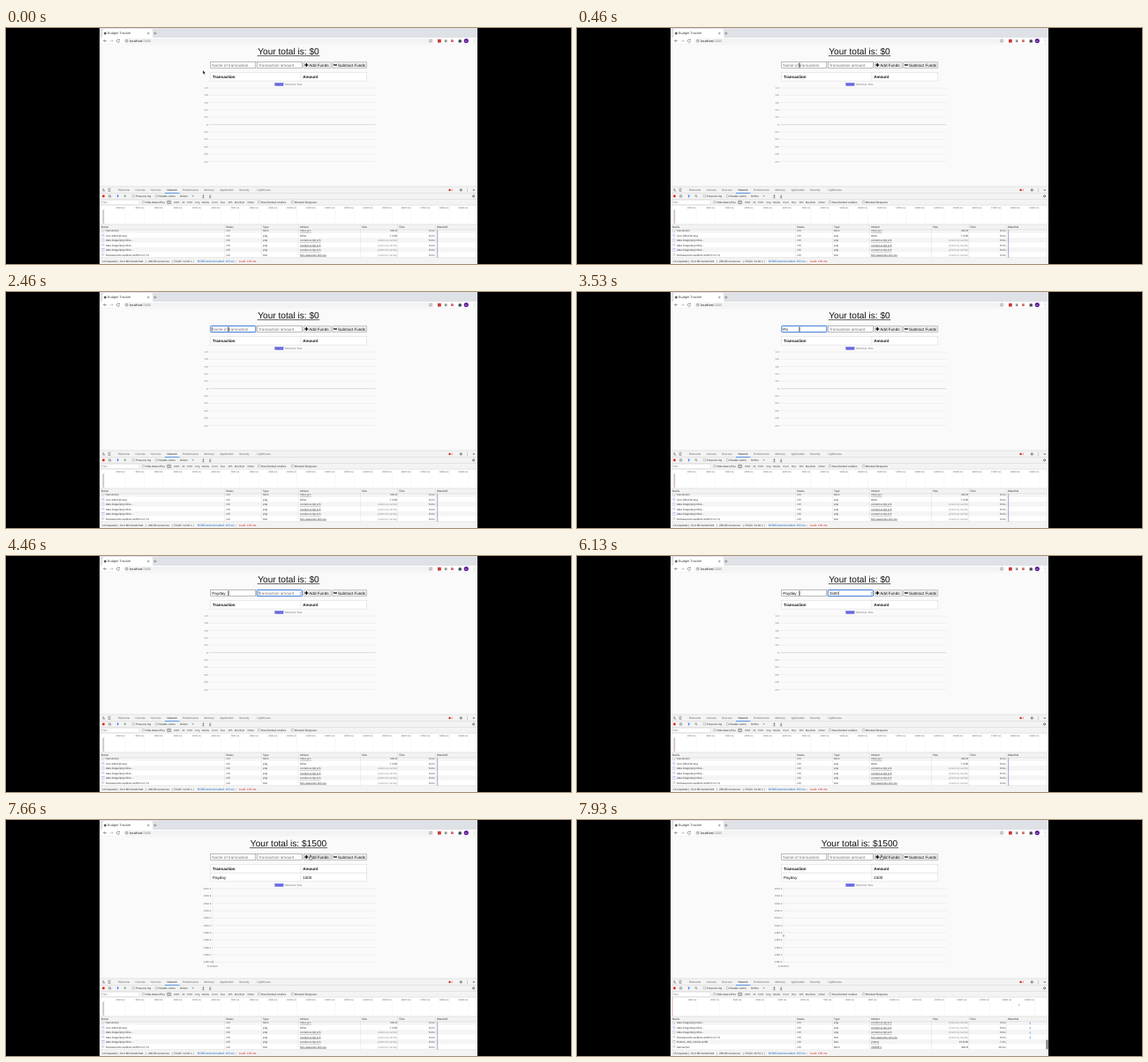
Write an HTML page that moves like this. It is 640 px wide and 268 px high and loops after 8 s.

```html
<!DOCTYPE html>
<html lang="en">
<head>
<meta charset="utf-8">
<title>Budget Tracker</title>
<style>
  html, body { margin: 0; width: 100%; height: 100%; overflow: hidden; background: #000; }
  svg { display: block; overflow: hidden; }
  #stage { width: 640px; height: 268px; }
  text { font-family: "Liberation Sans", Arial, sans-serif; text-rendering: geometricPrecision; white-space: pre; }
</style>
</head>
<body>
<svg id="stage" viewBox="0 0 640 268"></svg>
<script>
const LOOP = 8000, FRAME = 1000 / 15;
const stage = document.getElementById("stage");

function add(parent, tag, attrs = {}) {
  const node = document.createElementNS("http://www.w3.org/2000/svg", tag);
  for (const key in attrs) node.setAttribute(key, attrs[key]);
  return parent.appendChild(node);
}
const group = (parent, attrs) => add(parent, "g", attrs);
const rect = (p, x, y, width, height, fill, more) => add(p, "rect", { x, y, width, height, fill, ...more });
const line = (p, x1, y1, x2, y2, stroke, w = 0.5) => add(p, "line", { x1, y1, x2, y2, stroke, "stroke-width": w });
const dot = (p, cx, cy, r, fill, more) => add(p, "circle", { cx, cy, r, fill, ...more });
const path = (p, d, stroke = "#5f6368", more) => add(p, "path", { d, stroke, fill: "none", "stroke-width": 0.6, ...more });
function text(p, x, y, str, size = 3.1, fill = "#333", more = {}) {
  const node = add(p, "text", { x, y, "font-size": size, fill, ...more });
  node.textContent = str;
  return node;
}
const show = (node, on) => node.setAttribute("display", on ? "inline" : "none");
const END = { "text-anchor": "end" }, MID = { "text-anchor": "middle" };

// Browser frame
rect(stage, 0, 0, 640, 268, "#000");
rect(stage, 106, 0, 428, 268, "#fafafa");

function drawBrowser() {
  const g = group(stage);
  rect(g, 106, 0, 428, 11, "#dee1e6");
  path(g, "M108 11q1.5 0 1.5-2V3q0-2 2-2H164q2 0 2 2V9q0 2 1.5 2z", "none", { fill: "#fff" });
  dot(g, 112.3, 6, 1.5, "#5f6368");
  text(g, 115, 7.3, "Budget Tracker", 3.9, "#45494d");
  path(g, "M160.3 5l2 2m0-2l-2 2M167.4 6h3m-1.5-1.5v3");
  rect(g, 106, 11, 428, 7.2, "#fff");
  path(g, "M114 14.6h-3.4m1.4-1.4l-1.4 1.4 1.4 1.4");
  path(g, "M117.8 14.6h3.4m-1.4-1.4l1.4 1.4-1.4 1.4", "#b5b8bb");
  path(g, "M128.2 13.4a1.7 1.7 0 1 0 .5 1.6M128.6 12.6v1.2h-1.2");
  rect(g, 133, 11.8, 352, 5.6, "#f1f3f4", { rx: 2.8 });
  dot(g, 136.8, 14.6, 1.3, "none", { stroke: "#5f6368", "stroke-width": 0.5 });
  line(g, 136.8, 14.3, 136.8, 15.5, "#5f6368");
  const url = text(g, 140, 15.9, "localhost", 3.7, "#202124");
  const port = add(url, "tspan", { fill: "#80868b" });
  port.textContent = ":3000";
  path(g, "M481 12.8l.5 1.2 1.3.1-1 .9.3 1.2-1.1-.7-1.1.7.3-1.2-1-.9 1.3-.1z", "#5f6368", { "stroke-width": 0.4 });
  rect(g, 489, 12.8, 3.8, 3.8, "#c63b33");
  rect(g, 496.8, 13.4, 2.8, 2.8, "#8d9299");
  rect(g, 504, 13.3, 2.8, 2.8, "#cf6a66");
  path(g, "M512.6 13.4h1q.6-1.4 1.2 0h1v1q1.2.6 0 1.2v.9h-3.2z", "none", { fill: "#44474b" });
  dot(g, 521.3, 14.6, 2.6, "#5b1f94");
  text(g, 521.3, 15.7, "C", 3, "#fff", MID);
  [13, 14.6, 16.2].forEach(y => dot(g, 530, y, 0.4, "#5f6368"));
  line(g, 106, 18.2, 534, 18.2, "#e3e4e6", 0.4);
}

// Web page
const page = group(stage);
const title = text(page, 320, 30, "", 10.15, "#111", MID);
const underline = line(page, 0, 31.6, 0, 31.6, "#222", 0.7);

function makeInput(x, width, hint, typeSize) {
  const g = group(page);
  const box = rect(g, x, 38.6, width, 7, "#fff", { stroke: "#777", "stroke-width": 0.5 });
  const label = text(g, x + 1.5, 43.7, "", typeSize);
  const caret = rect(g, 0, 39.9, 0.4, 4.6, "#111");
  return (value, focus, caretOn) => {
    label.textContent = value || hint;
    label.setAttribute("fill", value ? "#111" : "#757575");
    box.setAttribute("stroke", focus ? "#3b78d8" : "#777");
    box.setAttribute("stroke-width", focus ? 1 : 0.5);
    box.setAttribute("rx", focus ? 0.6 : 0);
    caret.setAttribute("x", x + 1.7 + (value ? label.getComputedTextLength() : 0));
    show(caret, focus && caretOn);
  };
}
const setName = makeInput(231.8, 51, "Name of transaction", 4.6);
const setAmount = makeInput(284.2, 51.2, "Transaction amount", 4.6);
const spinner = path(page, "M332.4 41.4l.9-1 .9 1zM332.4 42.9l.9 1 .9-1z", "none", { fill: "#666" });

function button(x, width, label, labelX) {
  const b = rect(page, x, 38.6, width, 7, "#efefef", { stroke: "#888", "stroke-width": 0.45, rx: 0.5 });
  rect(page, x + 1.3, 41.4, 4, 1.2, "#000");
  text(page, labelX, 43.7, label, 4.6, "#111");
  return b;
}
const addButton = button(337, 31.2, "Add Funds", 343.3);
rect(page, 339.7, 40, 1.2, 4, "#000");
button(369.6, 39, "Subtract Funds", 376);

function tableRow(p, y, name, amount, weight) {
  rect(p, 231.8, y, 177, 9.7, "#fff", { stroke: "#d8d8d8", "stroke-width": 0.5 });
  line(p, 333.8, y, 333.8, y + 9.7, "#d8d8d8");
  text(p, 234, y + 6.4, name, 4.55, "#111", { "font-weight": weight });
  text(p, 336.2, y + 6.4, amount, 4.55, "#111", { "font-weight": weight });
}
tableRow(page, 50.4, "Transaction", "Amount", 700);
const newRow = group(page);
tableRow(newRow, 60.1, "Payday", "1500", 400);

function makeChart(top, left, middle) {
  const g = group(page);
  rect(g, 304.7, top - 5.5, 9.4, 3.1, "#6868e6", { stroke: "#5454dc", "stroke-width": 0.3 });
  text(g, 315.5, top - 2.9, "Total Over Time", 2.85, "#666");
  for (let i = 0; i <= 10; i++) {
    const y = top + i * 8.35, value = middle + (5 - i) / 5;
    line(g, left + 0.7, y, 418.5, y, value ? "#e4e4e4" : "#bdbdbd");
    text(g, left - 0.3, y + 1, value ? value.toFixed(1) : "0", 2.85, "#666", END);
  }
  return g;
}
const emptyChart = makeChart(68, 229, 0);
const fullChart = makeChart(77.9, 232.6, 1500);
line(fullChart, 234, 77.9, 234, 162.5, "#e4e4e4");
text(fullChart, 234, 166.9, "2/11/2021", 2.85, "#666", MID);
const point = dot(fullChart, 234, 161.4, 0.8, "#f4eaea", { stroke: "#7a5555", "stroke-width": 0.4 });

// Developer tools
const TOOL = "#5f6368", BAR = "#f3f3f3", RULE = "#cfcfcf";
const ROW = 5.45;

function checkbox(p, x, y, label) {
  rect(p, x - 3.6, y - 1.3, 2.4, 2.4, "#fff", { stroke: "#777", "stroke-width": 0.4, rx: 0.4 });
  text(p, x, y + 1.1, label);
}

function drawToolbars(g) {
  rect(g, 106, 180, 428, 88, "#fff");
  rect(g, 106, 180, 428, 21.2, BAR);
  [180, 187.6, 194.4, 201.2].forEach(y => line(g, 106, y, 534, y, RULE));
  path(g, "M110 182.4v3l.8-.7 1 .6zM116 182.3h2v3.2h-2z", TOOL, { "stroke-width": 0.5 });
  const tabs = { Elements: 127, Console: 146.5, Sources: 164, Network: 182.4, Performance: 200,
    Memory: 224.5, Application: 242.5, Security: 264, Lighthouse: 284.5 };
  for (const name in tabs) text(g, tabs[name], 185.2, name, 3.15, name === "Network" ? "#222" : TOOL);
  rect(g, 180, 187, 16.5, 0.7, "#1a73e8");
  dot(g, 502.6, 184, 1.2, "#d93025");
  text(g, 504.6, 185.2, "2", 3.1, "#d93025");
  [184, 191].forEach((y, i) => dot(g, i ? 529.6 : 515.3, y, 1.1, "none", { stroke: TOOL, "stroke-width": 0.9 }));
  [182.7, 184, 185.3].forEach(y => dot(g, 522.5, y, 0.4, TOOL));
  path(g, "M528.8 183l2 2m0-2l-2 2", TOOL);

  dot(g, 110.4, 191, 1.4, "#e0201b");
  dot(g, 117.6, 191, 1.3, "none", { stroke: TOOL, "stroke-width": 0.5 });
  line(g, 116.7, 190.1, 118.5, 191.9, TOOL);
  path(g, "M125.3 189.7h2.8l-1 1.3v1.6h-.8v-1.6z", "none", { fill: "#1a73e8" });
  dot(g, 134.6, 190.6, 0.9, "none", { stroke: TOOL, "stroke-width": 0.5 });
  line(g, 135.2, 191.2, 136.3, 192.3, TOOL);
  checkbox(g, 146.8, 191, "Preserve log");
  checkbox(g, 172.6, 191, "Disable cache");
  text(g, 197, 192.1, "Online");
  path(g, "M210.5 190.4h2.2l-1.1 1.4z", "none", { fill: TOOL });
  path(g, "M223.5 192.3v-2.6m-1 1l1-1 1 1M231.2 189.3v2.6m-1-1l1 1 1-1M222.3 192.8h2.4M230 192.8h2.4", TOOL);

  rect(g, 107, 195.2, 44, 5.2, "#fff", { stroke: RULE, "stroke-width": 0.4 });
  text(g, 108.2, 198.9, "Filter", 3.1, "#777");
  checkbox(g, 158.2, 197.8, "Hide data URLs");
  rect(g, 182.2, 195.7, 5, 4.2, "#a3a6a9", { rx: 1.2 });
  const kinds = { All: 182.9, XHR: 190, JS: 199, CSS: 205, Img: 214.3, Media: 222, Font: 233.5,
    Doc: 243, WS: 251.7, Manifest: 258.8, Other: 273.6 };
  for (const name in kinds) text(g, kinds[name], 198.9, name, 3, name === "All" ? "#fff" : "#444");
  checkbox(g, 289, 197.8, "Has blocked cookies");
  checkbox(g, 327, 197.8, "Blocked Requests");
}

function timeline(p, start, step) {
  const g = group(p);
  for (let i = 1; start + step * i < 533; i++) {
    const x = start + step * i;
    line(g, x, 201.4, x, 222.8, "#ececec", 0.4);
    text(g, x - 0.7, 204.6, i * 1000 + " ms", 2.5, "#555", END);
  }
  return g;
}

function networkRows(p) {
  const image = ["data image/png inline...", "png", "content-script.js:6", "(memory cache)", "0 ms"];
  const list = [
    ["transaction", "fetch", "index.js:1", "284 B", "8 ms"],
    ["icon-192x192.png", "png", "Other", "7.3 kB", "8 ms"],
    image, image, image,
    ["fontawesome-webfont.woff2?v=4.7.0", "font", "font-awesome.min.css", "(memory cache)", "0 ms"],
    ["Roboto_300_normal.woff2", "font", "(index)", "15.8 kB", "7 ms"],
    ["transaction", "fetch", "VM206:1", "304 B", "16 ms"]
  ];
  list.forEach(([name, type, from, size, time], i) => {
    const y = 227.4 + i * ROW, base = y + 3.9;
    rect(p, 106, y, 428, ROW, i % 2 ? "#fff" : "#f5f5f5");
    rect(p, 109, y + 1.5, 2, 2.5, "#fff", { stroke: type === "png" ? "#a58ad0" : "#999", "stroke-width": 0.4 });
    text(p, 113, base, name, 3);
    text(p, 249, base, "200", 3, "#666");
    text(p, 291, base, type, 3);
    text(p, 333, base, from, 3, "#333", from === "Other" ? {} : { "text-decoration": "underline" });
    text(p, 443, base, size, 3, size[0] === "(" ? "#888" : "#333", END);
    text(p, 485.5, base, time, 3, "#333", END);
  });
}

const tools = group(stage);
drawToolbars(tools);
const oldTimes = timeline(tools, 113.5, 21.6);
const newTimes = timeline(tools, 110.5, 25.5);
rect(oldTimes, 109.4, 206.5, 1.5, 15.5, "#c9c9c9");
line(oldTimes, 110.8, 205.5, 110.8, 222.5, "#d9a5ab", 0.4);
line(newTimes, 108, 201.4, 108, 222.8, "#d2555a", 0.5);
line(newTimes, 500, 210, 502, 210, "#888", 0.7);

const list = add(tools, "svg", { x: 106, y: 229, width: 428, height: 32, viewBox: "106 229 428 32" });
const rows = group(list);
networkRows(rows);
rect(tools, 106, 223, 428, 6, BAR);
[223, 229, 261].forEach(y => line(tools, 106, y, 534, y, RULE));
[247.5, 289.5, 331.3, 401.5, 443.7, 486.5].forEach(x => line(tools, x, 223, x, 261, "#d9d9d9", 0.4));
const columns = { Name: 108, Status: 249, Type: 291, Initiator: 333, Size: 403, Time: 445, Waterfall: 488 };
for (const name in columns) text(tools, columns[name], 227.1, name, 3.1);

const oldFall = group(tools), newFall = group(tools);
line(oldFall, 488.5, 229, 488.5, 261, "#6b8fd6", 0.6);
line(oldFall, 489.2, 229, 489.2, 261, "#dfb0b4", 0.4);
for (let y = 230.5; y < 252; y += ROW) rect(newFall, 512.8, y - 1, 0.8, 2.6, "#5b9be8");
rect(newFall, 531.4, 249.5, 2.2, 11, "#777", { rx: 1.1 });

rect(tools, 106, 261.2, 428, 6.8, BAR);
const requests = text(tools, 109, 265.7, "", 3.15);
text(tools, 126.3, 265.7, "|  31.0 kB transferred", 3.1);
text(tools, 158.5, 265.7, "|  268 kB resources", 3.1);
const finish = text(tools, 188, 265.7, "", 3.1);
text(tools, 216.8, 265.7, "DOMContentLoaded: 115 ms", 3.25, "#1565c8");
text(tools, 260.3, 265.7, "|", 3.1, "#999");
text(tools, 263.8, 265.7, "Load: 164 ms", 3.25, "#d02a24");

drawBrowser();

// Pointer
const ring = dot(stage, 0, 0, 8, "#f3b0b0", { "fill-opacity": 0.15, stroke: "#d4504f", "stroke-width": 0.8 });
const pointer = group(stage);
const arrow = path(pointer, "M0 0v4.3l1-.9.7 1.6.7-.3-.7-1.5h1.4z", "#fff", { fill: "#000", "stroke-width": 0.35 });
const beam = path(pointer, "M-.9-2.3q.9 0 .9.6v3.4q0 .6-.9.6M.9-2.3Q0-2.3 0-1.7v3.4q0 .6.9.6", "#222", { "stroke-width": 0.5 });
const hand = path(pointer, "M-.6-2.2q.6-.6 1 0V-.3L2 .2v1.4L1.4 2.8h-2L-2 .7l.5-.4.9.5z", "#111", { fill: "#fff", "stroke-width": 0.45 });

// Timing
const ease = p => p * p * (3 - 2 * p);
const clamp = p => Math.min(1, Math.max(0, p));
const latest = (steps, t) => steps.reduce((value, [at, next]) => t >= at ? next : value, "");
const within = (t, from, to) => t >= from && t < to;

const nameSteps = [[3000, "P"], [3060, "Pa"], [3730, "Payd"], [3800, "Payday"]];
const amountSteps = [[5530, "1"], [5660, "15"], [6060, "150"], [6130, "1500"]];
const caretSteps = [[1460, 1], [1930, 0], [2460, 1], [2930, 0], [3000, 1], [3530, 0], [3730, 1], [4260, 0],
  [4460, 1], [4930, 0], [5460, 1], [6600, 0], [7130, 1]];
const SENT = 7660, LOGGED = 7730;

function drawPointer(t) {
  const k = Math.floor((t + 7) / FRAME);
  const a = ease(clamp(k / 7)), b = ease(clamp((k - 98) / 10));
  const x = 223 + 29 * a + 93 * b, y = 48 - 5.8 * a;
  pointer.setAttribute("transform", `translate(${x} ${y})`);
  const onButton = x > 337, onInput = !onButton && x > 231.8 && y < 45.6;
  show(hand, onButton);
  show(beam, onInput);
  show(arrow, !onButton && !onInput);
  ring.setAttribute("cx", x);
  ring.setAttribute("cy", y + 0.6);
  show(ring, within(t, 1460, 1600) || within(t, 7530, SENT));
}

function draw(t) {
  const sent = t >= SENT, logged = t >= LOGGED;
  const caret = latest(caretSteps, t);
  const total = sent ? 1500 : 0, half = sent ? 44 : 35.3;
  title.textContent = "Your total is: $" + total;
  underline.setAttribute("x1", 320 - half);
  underline.setAttribute("x2", 320 + half);

  const onAmount = within(t, 4460, 7530);
  setName(sent ? "" : latest(nameSteps, t), within(t, 1460, 4460), caret);
  setAmount(sent ? "" : latest(amountSteps, t), onAmount, caret);
  show(spinner, onAmount);
  addButton.setAttribute("fill", t >= 7000 ? "#e3e3e3" : "#efefef");

  show(newRow, sent);
  show(emptyChart, !sent);
  show(fullChart, sent);
  const grow = 1 - (1 - clamp((t - SENT) / 1000)) ** 4;
  point.setAttribute("cy", 161.4 - 41.75 * grow);

  [oldTimes, oldFall].forEach(node => show(node, !logged));
  [newTimes, newFall].forEach(node => show(node, logged));
  rows.setAttribute("transform", `translate(0 ${logged ? -2 * ROW : 0})`);
  requests.textContent = (logged ? 15 : 14) + " requests";
  finish.textContent = `|  Finish: ${logged ? "20.51" : "14.46"} s  |`;
  drawPointer(t);
}

const start = performance.now();
function tick() {
  draw((performance.now() - start) % LOOP);
  requestAnimationFrame(tick);
}
tick();
</script>
</body>
</html>
```
